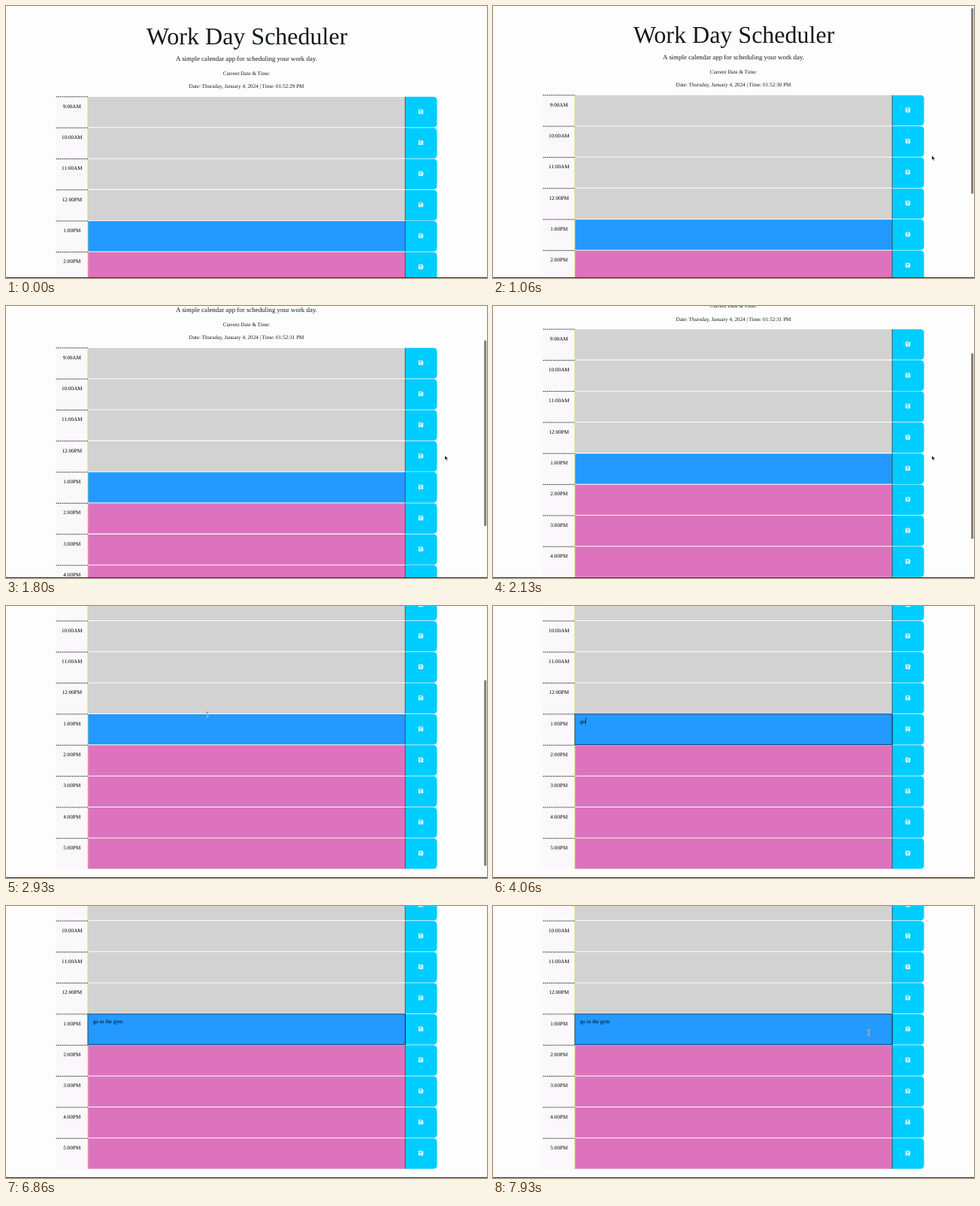
These frames come from a looping animation (640 px wide and 362 px high, 8 s). An HTML page:

```html
<!DOCTYPE html>
<html lang="en">
<head>
<meta charset="utf-8">
<title>Work Day Scheduler</title>
<style>
  html, body { margin: 0; width: 100%; height: 100%; overflow: hidden; background: #fdfdfd; }
  svg { display: block; width: 640px; height: 362px; }
  text { font: 7.11px "Liberation Serif", "Times New Roman", serif; text-rendering: geometricPrecision; white-space: pre; }
  .mid { text-anchor: middle; fill: #15181b; }
</style>
</head>
<body>
<svg id="stage" viewBox="0 0 640 362">
  <g id="page">
    <text class="mid" x="320.5" y="51.3" style="font-size:32px">Work Day Scheduler</text>
    <text class="mid" x="320" y="73" style="font-size:8.89px">A simple calendar app for scheduling your work day.</text>
    <text class="mid" x="320" y="91.6">Current Date &amp; Time:</text>
    <text class="mid" x="320" y="109.4" id="clock"></text>
    <g id="rows"></g>
    <g id="focus">
      <rect x="109" y="286" width="422.4" height="40.6" fill="none" stroke="#0b3f73" stroke-width="1"/>
      <text id="note" x="116" y="298.2"></text>
      <path id="caret" d="M0 291.6v8" stroke="#000" stroke-width=".6"/>
    </g>
  </g>
  <rect id="bar" x="636.2" width="3" height="247.5" rx="1.5" fill="#7c7c7c"/>
  <path id="arrow" d="M0 0V6L1.4 4.8L2.4 6.9L3.3 6.5L2.4 4.5H4.3Z" fill="#000" stroke="#fff" stroke-width=".5"/>
  <g id="beam" fill="none">
    <path d="M-1.7-3.5Q0-3.5 0-2.5Q0-3.5 1.7-3.5M0-2.5V2.5M-1.7 3.5Q0 3.5 0 2.5Q0 3.5 1.7 3.5" stroke="#fff" stroke-width="1.5"/>
    <path d="M-1.7-3.5Q0-3.5 0-2.5Q0-3.5 1.7-3.5M0-2.5V2.5M-1.7 3.5Q0 3.5 0 2.5Q0 3.5 1.7 3.5" stroke="#222" stroke-width=".6"/>
  </g>
  <rect y="361" width="640" height="1" fill="#333"/>
</svg>
<script>
const LOOP = 8000, STEP = 200 / 3;
const ROW_TOP = 120.4, ROW_HEIGHT = 41.33;
const NOTE = "go to the gym";
const KEY_TIMES = [3930, 4060, 4200, 4260, 4400, 4460, 4600, 4660, 4860, 5060, 5260, 5460, 5530];
// Tracks are lists of [time, ...values].
const SCROLL = [[1000, 0], [1130, 4], [1330, 19], [1800, 65], [1930, 73], [2130, 89.5], [2600, 137], [2730, 142.2]];
const POINTER = [[60, 577, 364], [200, 579, 300], [400, 583, 215], [600, 584, 199], [2730, 584, 199],
  [2930, 269, 144], [3100, 215, 160], [3260, 200, 163], [7260, 200, 163], [7600, 400, 167], [7930, 500, 168.5]];

const $ = id => document.getElementById(id);
const show = (id, on) => $(id).setAttribute("visibility", on ? "visible" : "hidden");
const move = (id, x, y) => $(id).setAttribute("transform", `translate(${x} ${y})`);
const between = (t, from, to) => t >= from && t < to;

function sample(track, t) {
  const next = track.findIndex(key => key[0] > t);
  if (next === 0) return track[0].slice(1);
  if (next < 0) return track[track.length - 1].slice(1);
  const a = track[next - 1], b = track[next];
  const part = (t - a[0]) / (b[0] - a[0]);
  return a.slice(1).map((v, i) => v + (b[i + 1] - v) * part);
}

function row(i) {
  const hour = 9 + i;
  const label = `${hour > 12 ? hour - 12 : hour}:00${hour < 12 ? "AM" : "PM"}`;
  const fill = hour < 13 ? "#d2d2d2" : hour === 13 ? "#2499ff" : "#dd73bd";
  return `<g transform="translate(0 ${ROW_TOP + i * ROW_HEIGHT})">
    <path d="M66.5 .4H109V41.3H66.5Z" fill="#faf8fa"/>
    <path d="M66.5 .4H109" stroke="#000" stroke-width=".8" stroke-dasharray="1.8 .9"/>
    <text x="87.8" y="15.2" text-anchor="middle">${label}</text>
    <path d="M109 .5H531V40.8H109Z" fill="${fill}"/>
    <path d="M108.9 .4V41.3" stroke="#d3de78" stroke-width=".9"/>
    <path d="M531.2 .4H568.5Q573.5 .4 573.5 5.4V36Q573.5 41 568.5 41H531.2Z" fill="#00cdff"/>
    <path d="M531.2 .4V41" stroke="#123" stroke-width=".7"/>
    <path d="M549.6 17H553.7L555.1 18.4V22.4Q555.1 23.1 554.4 23.1H549.6Q548.9 23.1 548.9 22.4V17.7Q548.9 17 549.6 17Z" fill="#fff"/>
    <path d="M549.8 18H553.4V19.5H549.8Z" fill="#00cdff"/>
    <circle cx="552" cy="21.3" r=".9" fill="#00cdff"/>
  </g>`;
}
$("rows").innerHTML = Array.from({ length: 9 }, (_, i) => row(i)).join("");

function draw(time) {
  const t = Math.floor((time + 7) / STEP) * STEP;
  const [scroll] = sample(SCROLL, t);
  move("page", 0, -scroll);
  const second = t < 195 ? 29 : t < 1195 ? 30 : t < 2195 ? 31 : 32;
  $("clock").textContent = `Date: Thursday, January 4, 2024 | Time: 01:52:${second} PM`;

  $("bar").setAttribute("y", 1 + scroll * 0.685);
  $("bar").setAttribute("opacity", t < 1060 ? 0 : Math.max(0, Math.min(1, (3260 - t) / 250)));

  const [x, y] = sample(POINTER, t);
  const visible = between(t, 60, 3930) || t >= 7330;
  const overField = x < 531;
  show("arrow", visible && !overField);
  show("beam", visible && overField);
  move("arrow", x, y);
  move("beam", x, y);

  const focused = t >= 3460;
  show("focus", focused);
  $("note").textContent = NOTE.slice(0, KEY_TIMES.filter(k => k <= t + 7).length);
  const blink = between(t, 6060, 6330) || between(t, 6860, 7060) || t >= 7590;
  show("caret", focused && !blink);
  move("caret", 116.3 + $("note").getComputedTextLength(), 0);
}

const start = performance.now();
function tick() {
  draw((performance.now() - start) % LOOP);
  requestAnimationFrame(tick);
}
tick();
</script>
</body>
</html>
```
